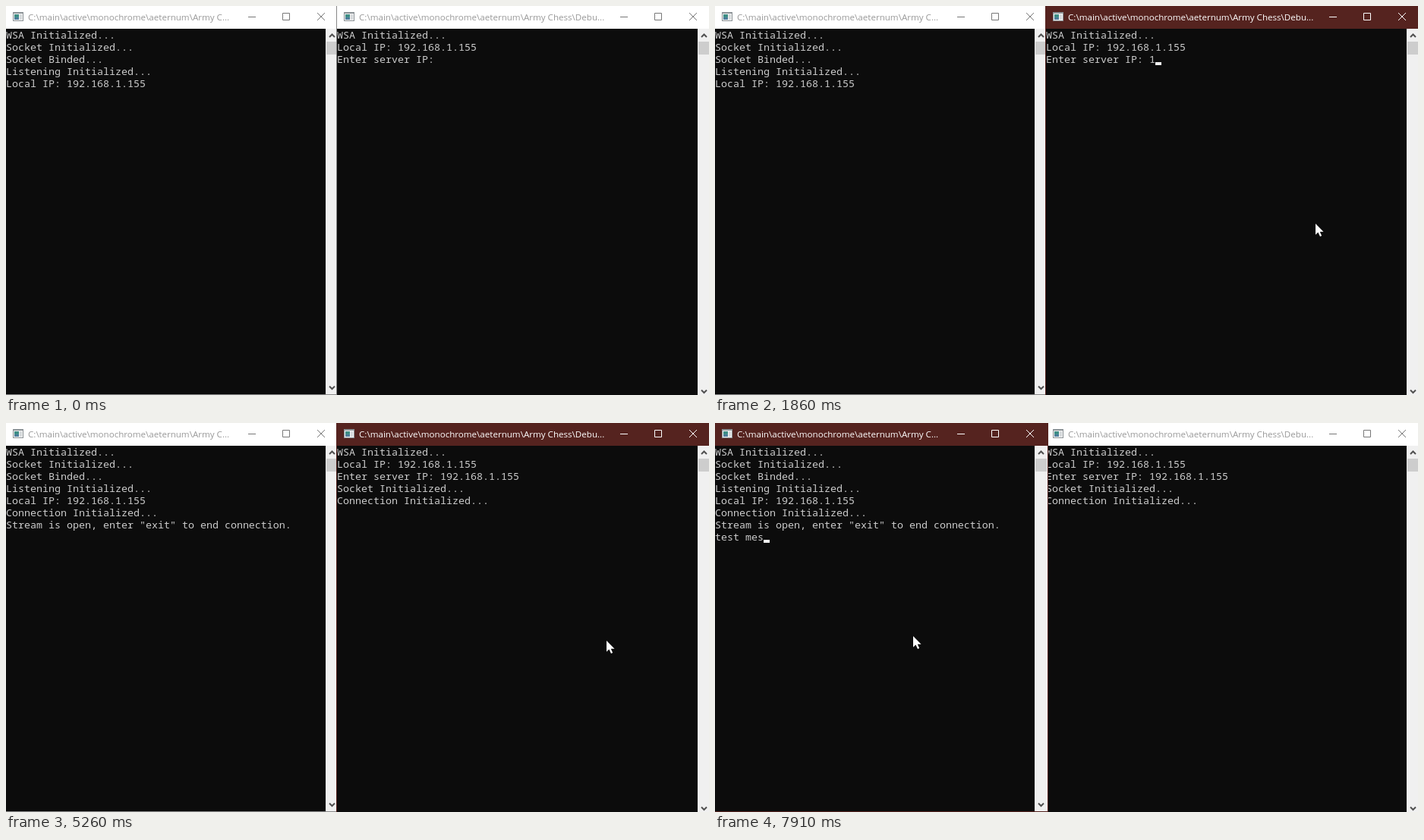
Animation of 926 by 513 pixels, one loop 8000 ms. Source, as an HTML page:

```html
<!DOCTYPE html>
<html lang="en">
<head>
<meta charset="utf-8">
<title>Two consoles</title>
<style>
  html, body { margin: 0; width: 100%; height: 100%; overflow: hidden; background: #0c0c0c; }
  svg { display: block; width: 926px; height: 513px; }
  text { white-space: pre; }
  .title { font: 11.6px "Open Sans", "Noto Sans", sans-serif; }
  .line { font: 13.333px "Noto Sans Mono", "DejaVu Sans Mono", monospace; fill: #ccc; }
</style>
</head>
<body>
<svg id="stage" viewBox="0 0 926 513"></svg>
<script>
const LOOP = 8000;
const CONNECT = 5260, FOCUS_RIGHT = 690, FOCUS_LEFT = 6280;
const ACTIVE = '#55231f';
const stage = document.getElementById('stage');

function add(parent, tag, attrs, text) {
  const el = document.createElementNS('http://www.w3.org/2000/svg', tag);
  for (const key in attrs) el.setAttribute(key, attrs[key]);
  if (text) el.textContent = text;
  parent.appendChild(el);
  return el;
}

function rect(parent, x, y, width, height, fill) {
  return add(parent, 'rect', { x, y, width, height, fill });
}

function icon(g) {
  rect(g, 9, 8, 14, 12, '#8b9296');
  rect(g, 10, 10, 12, 9, '#f4f4f4');
  rect(g, 11, 11, 6, 7, '#3f8f86');
  rect(g, 11, 15, 6, 3, '#4f7f9c');
  rect(g, 18, 11, 3, 7, '#d5d9db');
}

function chevron(g, x, y, dir) {
  add(g, 'path', {
    d: `M${x - 3.5} ${y + 2 * dir}L${x} ${y - 1.5 * dir}L${x + 3.5} ${y + 2 * dir}`,
    fill: 'none', stroke: '#505050', 'stroke-width': 2
  });
}

// A console window; the frame is one pixel wide around the client area.
function makeWindow(x, width, height, title, rows) {
  const g = add(stage, 'g', { transform: `translate(${x} 0)` });
  const frame = rect(g, -1, -1, width + 2, height + 2, '#888');
  const bar = rect(g, 0, 0, width, 30, '#fff');
  rect(g, 0, 30, width, height - 30, '#0c0c0c');
  icon(g);
  const label = add(g, 'text', { class: 'title', x: 29, y: 19 }, title);
  const buttons = add(g, 'path', {
    d: `M${width - 119} 14.5h10M${width - 73.5} 9.5h9v9h-9z` +
       `M${width - 28} 9l10 10m0 -10l-10 10`,
    fill: 'none', 'stroke-width': 1
  });
  const side = width - 17;
  rect(g, side, 30, 17, height - 30, '#f0f0f0');
  rect(g, side + 1, 47, 15, 17, '#cdcdcd');
  chevron(g, side + 8.5, 39, 1);
  chevron(g, side + 8.5, height - 8.5, -1);
  const lines = Array.from({ length: rows }, (_, i) =>
    add(g, 'text', { class: 'line', x: 0, y: 43 + 16 * i }));
  const caret = rect(g, 0, 0, 8, 4, '#f2f2f2');

  return {
    g,
    focus(on) {
      frame.setAttribute('fill', on ? ACTIVE : '#888');
      bar.setAttribute('fill', on ? ACTIVE : '#fff');
      label.setAttribute('fill', on ? '#fff' : '#999');
      buttons.setAttribute('stroke', on ? '#fff' : '#777');
    },
    print(content) {
      lines.forEach((el, i) => {
        const s = content[i] || '';
        if (el.textContent !== s) el.textContent = s;
      });
    },
    setCaret(on, col, row) {
      caret.setAttribute('visibility', on ? 'visible' : 'hidden');
      caret.setAttribute('x', col * 8);
      caret.setAttribute('y', 42 + 16 * row);
    }
  };
}

const path = 'C:\\main\\active\\monochrome\\aeternum\\Army C';
const left = makeWindow(0, 438, 512, path + '...', 8);
const right = makeWindow(436, 492, 517, path + 'hess\\Debu...', 5);
const pointer = add(stage, 'path', {
  d: 'M0 0V14.8L3.4 11.6L6 17L8.2 16L5.8 10.8H10.6Z',
  fill: '#fff', stroke: '#000', 'stroke-width': 1, 'paint-order': 'stroke'
});

// Each key shows the caret, each blink flips it.
function typing(text, keys, blinks) {
  const events = [...keys.map(at => ({ at, key: true })), ...blinks.map(at => ({ at }))]
    .sort((a, b) => a.at - b.at);
  return t => {
    let n = 0, on = false;
    for (const e of events) {
      if (e.at > t) break;
      if (e.key) n++;
      on = e.key || !on;
    }
    return { text: text.slice(0, n), on };
  };
}

const address = typing('192.168.1.155',
  [1860, 1940, 2030, 2320, 2550, 2720, 2870, 3410, 3790, 4020, 4420, 4570, 4800],
  [1240, 1710, 2240, 2790, 3330, 3870, 4340, 4880]);
const message = typing('test mes',
  [6980, 7130, 7210, 7290, 7440, 7670, 7840, 7910],
  [6830, 7360]);

// The pointer is sampled about every 78 ms, then jumps to its resting place.
function glide(t, start, from, to) {
  const step = Math.min(5, Math.floor((t - start) / 77.5) + 1);
  const p = 1 - Math.pow(1 - step / 5, 2);
  return from.map((v, i) => Math.round(v + (to[i] - v) * p));
}

function pointerAt(t) {
  if (t < 300) return null;
  if (t < FOCUS_RIGHT) return glide(t, 300, [856, 530], [792, 288]);
  if (t < 5890) return [791, 287];
  if (t < FOCUS_LEFT) return glide(t, 5890, [791, 287], [263, 281]);
  return [261, 281];
}

function render(t) {
  const linked = t >= CONNECT;
  const leftOn = t >= FOCUS_LEFT;
  const rightOn = t >= FOCUS_RIGHT && !leftOn;
  const ip = address(t), msg = message(t);

  left.print([
    'WSA Initialized...', 'Socket Initialized...', 'Socket Binded...',
    'Listening Initialized...', 'Local IP: 192.168.1.155',
    ...(linked ? ['Connection Initialized...',
      'Stream is open, enter "exit" to end connection.', msg.text] : [])
  ]);
  right.print([
    'WSA Initialized...', 'Local IP: 192.168.1.155', 'Enter server IP: ' + ip.text,
    ...(linked ? ['Socket Initialized...', 'Connection Initialized...'] : [])
  ]);
  left.setCaret(msg.on, msg.text.length, 7);
  right.setCaret(ip.on, 17 + ip.text.length, 2);
  left.focus(leftOn);
  right.focus(rightOn);

  const top = leftOn ? left.g : right.g;
  if (pointer.previousSibling !== top) stage.insertBefore(top, pointer);

  const pos = pointerAt(t);
  pointer.setAttribute('visibility', pos ? 'visible' : 'hidden');
  if (pos) pointer.setAttribute('transform', `translate(${pos[0]} ${pos[1]})`);
}

const began = performance.now();
function tick() {
  render((performance.now() - began) % LOOP);
  requestAnimationFrame(tick);
}
tick();
</script>
</body>
</html>
```
